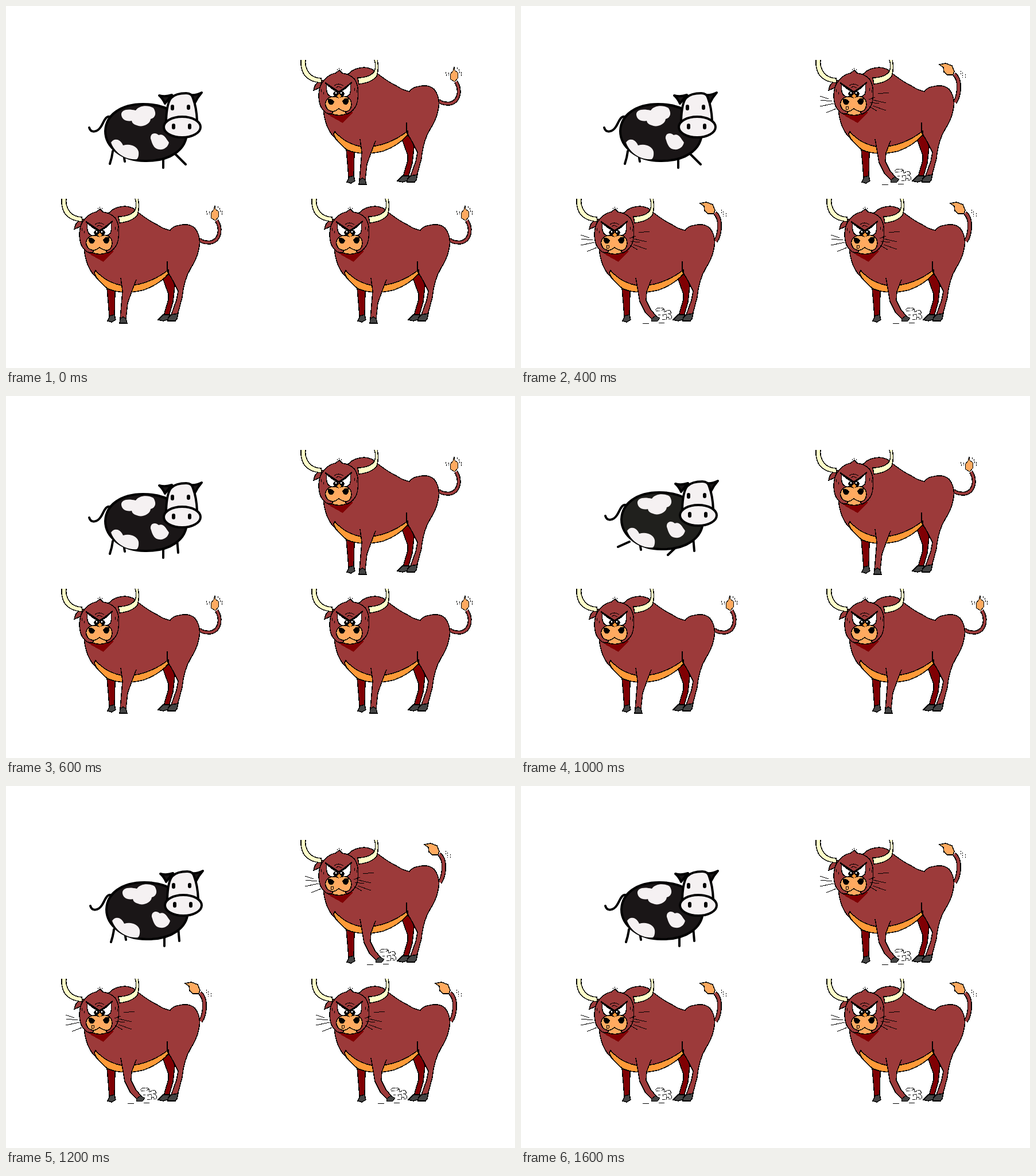
An HTML page that plays this animation: 887 by 631 pixels, repeating every 1800 ms.

```html
<!DOCTYPE html>
<html lang="en">
<head>
<meta charset="utf-8">
<title>Cow and bulls</title>
<style>
  html, body { margin: 0; width: 100%; height: 100%; overflow: hidden; background: #fff; }
  svg { display: block; }
  .bull { stroke: #000; stroke-width: 1.5; stroke-linejoin: round; fill: none; }
  .red { fill: #9c3a3a; }
  .dark { fill: #800004; }
  .hoof { fill: #444; }
  .horn { fill: #ffffc8; }
  .tan { fill: #ffaa60; }
  .belly { fill: #ff9a38; }
  .white { fill: #fff; }
  .black { fill: #000; }
  .thin { stroke-width: 1; }
  .cow { stroke: #000; stroke-width: 4; stroke-linecap: round; stroke-linejoin: round; fill: none; }
  .patch { fill: #f5f1f2; stroke: none; }
  .face { fill: #f5f1f2; }
  .ink { fill: #1a1617; }
</style>
</head>
<body>
<svg width="887" height="631" viewBox="0 0 887 631">
  <defs>
    <clipPath id="frame"><rect x="90" y="336" width="300" height="218"/></clipPath>

    <g id="back">
      <path class="dark" d="M176 492 L178 515 L180 541 H189 L190 497Z"/>
      <path class="hoof" d="M181 540 L189 538 L191 547 L184 551 L177 549Z"/>
      <path class="dark" d="M273 474 L283 502 L283 512 L275 539 L284 540 L291 516 L294 488 L287 463Z"/>
      <path class="hoof" d="M274 538 L285 538 L284 546 L274 549 L265 547Z"/>
      <path class="red" d="M180 360 Q189 350 207 349 Q222 350 228 358 Q248 374 263 381 Q275 389 286 391
        Q292 383 303 382 Q319 378 329 387 Q341 402 336 424 Q333 440 322 457 Q310 477 307 508 L299 538 H288
        L297 513 L300 497 L291 479 L283 465 Q264 486 236 496 Q202 503 177 493 Q160 477 150 465
        Q137 447 136 418 L150 380Z"/>
      <path class="hoof" d="M288 538 L300 536 L298 545 L295 549 H282 L283 543Z"/>
      <path class="belly" d="M156 461 Q176 484 208 488 Q248 487 283 460 V467 Q266 486 240 495 Q205 504 178 493 Q158 478 154 465Z"/>
      <path d="M281 445 V462 L285 470"/>
    </g>

    <g id="head">
      <path class="dark" d="M138 426 L150 435 L170 446 L187 428 L184 418Z" stroke="none"/>
      <path class="red" d="M139 371 Q124 373 121 382 L119 389 L131 384Z"/>
      <path class="horn" d="M98 330 Q95 347 101 359 Q109 374 133 376 L132 368 Q113 367 107 351 Q103 344 106 330Z"/>
      <path class="horn" d="M223 330 Q230 348 224 357 Q216 367 196 367 L198 378 Q220 376 229 364 Q234 351 229 330Z"/>
      <path class="red" d="M133 377 Q144 361 157 359 L164 354 L169 359 Q182 361 190 369 Q199 382 196 404 Q194 423 178 430 L145 430 Q129 424 128 400 Q128 385 133 377Z"/>
      <path d="M163 350 v2 M160 352 v2 M167 352 v2 M190 385 v5 M194 388 v5 M132 387 v5 M136 392 v4" class="thin"/>
      <path class="white" d="M142 378 Q149 386 159 391 L158 400 Q149 402 144 396 Q140 389 142 378Z"/>
      <path class="white" d="M183 377 Q177 386 165 391 L166 400 Q177 402 182 396 Q185 387 183 377Z"/>
      <path stroke-width="2.5" d="M139 376 L154 386 L163 392 L172 386 L186 375"/>
      <path class="thin" d="M155 381 Q162 375 171 381 M158 385 L162 382 L168 385"/>
      <path class="tan" d="M146 402 Q154 398 163 402 Q173 397 180 402 Q187 408 184 419 Q181 426 174 426 L176 430 Q163 435 151 430 L153 426 Q143 425 140 416 Q138 407 146 402Z"/>
      <path d="M151 427 Q158 425 163 421 Q170 426 177 426"/>
      <path class="black" d="M145 405 Q150 403 154 409 Q153 414 148 413 Q144 410 145 405Z M179 404 Q173 402 170 408 Q171 414 176 413 Q181 409 179 404Z"/>
      <circle class="black" cx="158" cy="395" r="4"/>
      <circle class="black" cx="168" cy="395" r="4"/>
      <path class="belly" stroke="none" d="M159 399 L163 395 L167 399 L163 403Z"/>
      <path class="white" stroke="none" d="M157 392 h2 v3 h-2Z M166 392 h2 v3 h-2Z"/>
    </g>

    <g id="stand" class="bull" shape-rendering="crispEdges" clip-path="url(#frame)">
      <path stroke-width="7" d="M337 407 Q343 413 357 412 Q370 409 372 394 Q373 383 367 374"/>
      <path stroke="#9c3a3a" stroke-width="4" d="M337 407 Q343 413 357 412 Q370 409 372 394 Q373 383 367 374"/>
      <path class="tan thin" d="M364 348 L362 355 L357 361 L358 370 L365 374 L371 367 L370 358 L365 354Z"/>
      <path class="thin" stroke-dasharray="3 1" d="M349 357 L351 364 M354 358 L355 363 M372 352 L374 359 M376 357 L377 364 M369 349 v3"/>
      <use href="#back"/>
      <path class="red" stroke="none" d="M201 474 L203 499 L199 545 H209 L212 518 L219 498 L226 478Z"/>
      <path d="M200 474 L203 497 L199 545 M227 477 L219 498 L212 518 L209 545"/>
      <path class="hoof" d="M199 545 L204 542 L209 545 L211 553 H198Z"/>
      <use href="#head"/>
    </g>

    <g id="paw" class="bull" shape-rendering="crispEdges">
      <g clip-path="url(#frame)">
        <path stroke-width="8" d="M339 410 Q346 400 346 382 Q346 368 338 361"/>
        <path stroke="#9c3a3a" stroke-width="5" d="M339 410 Q346 400 346 382 Q346 368 338 361"/>
        <path class="tan" d="M312 344 L323 342 L334 346 L338 356 L336 362 L326 362 L320 357 L319 349Z"/>
        <path class="thin" stroke-dasharray="2 2" d="M349 355 v7 M352 358 v9 M357 361 v6"/>
        <use href="#back"/>
        <path class="red" stroke="none" d="M201 474 L204 497 L207 515 L216 533 L228 546 L236 541 L226 529 L218 513 L219 498 L226 478Z"/>
        <path d="M200 474 L204 497 L207 515 L216 533 L228 546 M227 477 L219 498 L218 513 L226 529 L236 541"/>
        <path class="hoof thin" d="M228 545 L234 540 L242 544 L238 549 L227 550Z"/>
        <path class="thin" stroke-dasharray="5 1" d="M234 530 l4 -4 h9 l3 3 M235 531 h7 M245 531 l4 -3 v5 M250 534 l5 -4 l5 1 l2 5 h-6 M247 541 v-4 h6 v4 M258 536 l4 4 v5 h-5 M246 546 h7 v-4 h4 v4 M239 538 h4"/>
        <use href="#head"/>
        <path class="thin" d="M104 399 L119 404 M105 406 L125 408 M104 417 L128 412 M115 428 L132 421
          M189 405 L200 401 M205 395 L224 393 M197 406 L219 411 M191 410 L207 412 M196 416 L219 424 M190 417 L203 425"/>
        <path class="tan thin" d="M149 417 h4 v5 h-4Z"/>
        <path class="thin" d="M212 553 h11 M240 552 h10"/>
      </g>
    </g>
  </defs>

  <g id="cow" class="cow">
    <path id="legs"/>
    <path d="M187 192 C176 184 173 199 167 208 C161 217 150 219 147 209"/>
    <path id="hide" class="ink" d="M175 215 C176 187 202 168 241 168 C282 168 317 189 317 219 C316 247 289 267 247 267 C205 268 175 243 175 215Z"/>
    <path class="patch" d="M203 187 C202 179 212 175 228 179 C234 170 250 169 259 175 C266 186 260 193 254 194 C253 204 238 209 230 205 Q222 203 221 197 C212 199 204 195 203 187Z"/>
    <path class="patch" d="M185 235 C190 227 201 228 206 240 C219 236 231 242 233 251 Q234 260 230 264 C211 266 191 253 185 235Z"/>
    <path class="patch" d="M254 228 C253 219 262 216 268 222 C277 219 280 227 286 235 C284 244 276 248 269 247 C259 246 257 237 254 228Z"/>
    <path class="ink" d="M269 153 Q280 156 291 152 L279 167 Q275 158 269 153Z M324 152 Q333 153 343 148 Q336 156 331 166Z"/>
    <path class="face" d="M281 197 Q282 166 290 157 Q298 149 316 149 Q326 149 328 158 Q334 174 335 197Z"/>
    <ellipse class="face" cx="309" cy="208" rx="32" ry="18"/>
    <path stroke-width="6" d="M292 172 v4 M320 172 v3"/>
    <path stroke-width="6" d="M294 205 v4 M322 205 v4"/>
  </g>

  <g id="bulls">
    <use x="417" y="-242"/>
    <use/>
    <use x="436"/>
  </g>
</svg>
<script>
  const STEP = 200;
  const HIND = "M188 250 Q187 260 183 272 M208 262 L209 268 ";
  const STRAIGHT = HIND + "M276 256 V279 M300 246 L302 270";
  const STRIDE = HIND + "M276 256 V279 M294 252 L315 273";
  const SPLAY = "M189 254 L169 263 M208 262 L209 268 M277 257 L256 277 M300 246 L302 270";

  const pose = (legs, x = 0, y = 0, hide = "#1a1617") => ({ legs, x, y, hide });
  const stride = pose(STRIDE, -2, 3);
  const passing = pose(STRAIGHT, -2, 3);
  const splay = pose(SPLAY, 0, 0, "#20201d");
  const level = pose(STRAIGHT);
  const raised = pose(STRAIGHT, 0, -6);
  const walk = [stride, passing, stride, passing, raised, splay, level, splay, level];

  const byId = id => document.getElementById(id);
  const bulls = byId("bulls").children;

  function draw(now) {
    const step = Math.floor(now / STEP) % walk.length;
    const { legs, x, y, hide } = walk[step];
    byId("cow").setAttribute("transform", `translate(${x} ${y})`);
    byId("legs").setAttribute("d", legs);
    byId("hide").style.fill = hide;
    const pawing = step > 0 && step % 2 === 0;
    for (const bull of bulls) bull.setAttribute("href", pawing ? "#paw" : "#stand");
  }

  const start = performance.now();
  function tick() {
    draw(performance.now() - start);
    requestAnimationFrame(tick);
  }
  tick();
</script>
</body>
</html>
```
